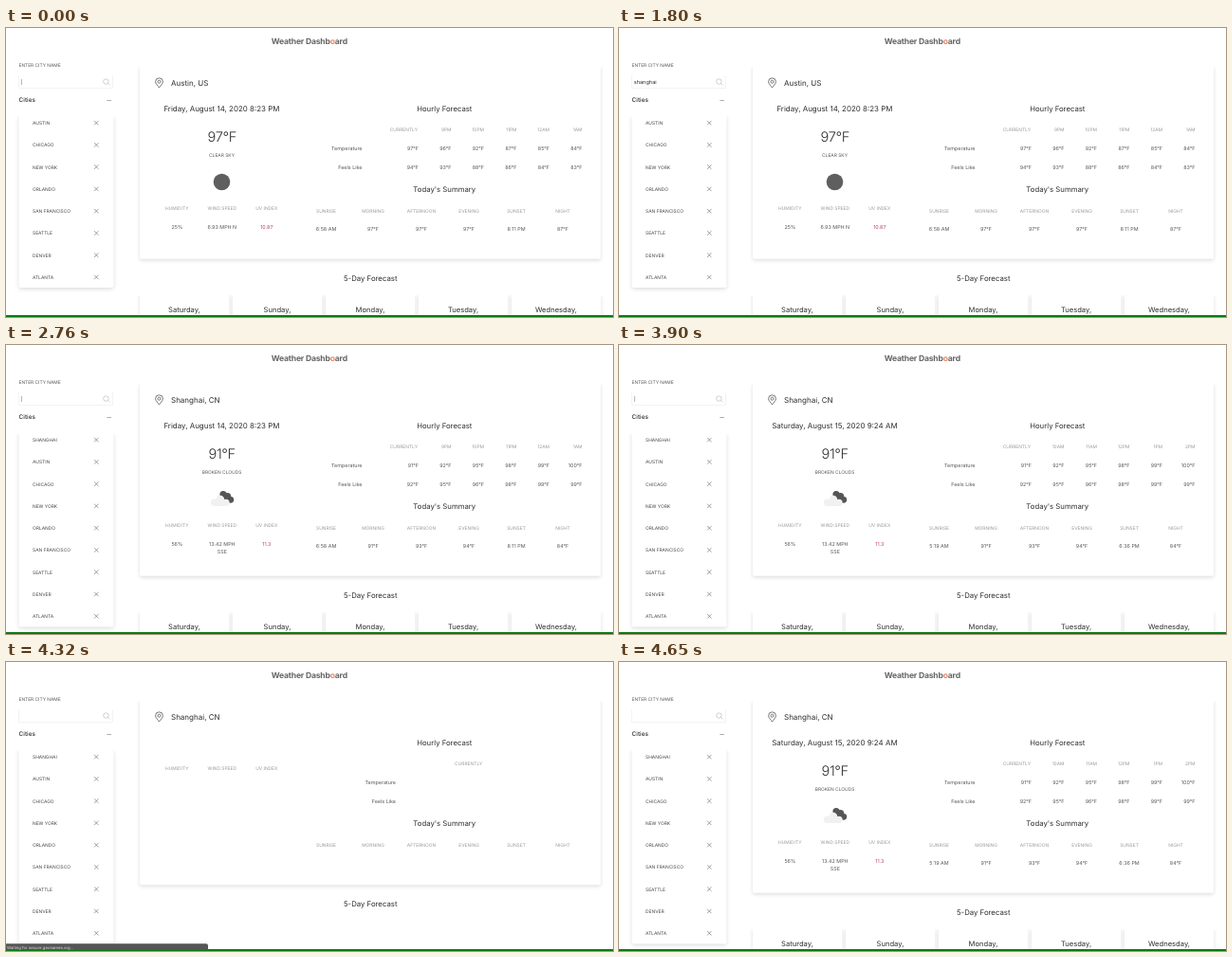
An HTML page with a canvas for the animation above (5430 ms loop, 640x305 px).

```html
<!DOCTYPE html>
<html lang="en">
<head>
<meta charset="utf-8">
<title>Weather Dashboard</title>
<style>
html, body { margin: 0; width: 100%; height: 100%; overflow: hidden; background: #fff; }
canvas { display: block; width: 640px; height: 305px; }
</style>
</head>
<body>
<canvas id="stage"></canvas>
<script>
const LOOP = 5430;
const canvas = document.getElementById('stage');
const ctx = canvas.getContext('2d');
const scale = window.devicePixelRatio || 1;
canvas.width = 640 * scale;
canvas.height = 305 * scale;

const INK = '#2e2e2e', MID = '#555', PALE = '#999';
const cities = ['AUSTIN', 'CHICAGO', 'NEW YORK', 'ORLANDO', 'SAN FRANCISCO', 'SEATTLE', 'DENVER', 'ATLANTA'];
const days = ['Saturday,', 'Sunday,', 'Monday,', 'Tuesday,', 'Wednesday,'];
const parts = ['SUNRISE', 'MORNING', 'AFTERNOON', 'EVENING', 'SUNSET', 'NIGHT'];
const hourX = [435, 469.5, 504, 538.5, 573, 607.5];
const partX = [337.5, 387, 438, 488, 538, 587];
const statX = [180.3, 227.8, 274.8];
const typedAt = [600, 690, 840, 990, 1080, 1230, 1290, 1350];

const evening = ['9PM', '10PM', '11PM', '12AM', '1AM'];
const austin = {
  date: 'Friday, August 14, 2020 8:23 PM', hours: evening,
  now: 97, sky: 'CLEAR SKY', humidity: '25%', wind: ['6.93 MPH N'], uv: '10.87',
  temps: [97, 96, 92, 87, 85, 84], feels: [94, 93, 88, 86, 84, 83],
  summary: ['6:58 AM', '97°F', '97°F', '97°F', '8:11 PM', '87°F']
};
const shanghai = {
  date: austin.date, hours: evening,
  now: 91, sky: 'BROKEN CLOUDS', humidity: '56%', wind: ['13.42 MPH', 'SSE'], uv: '11.3',
  temps: [91, 92, 95, 98, 99, 100], feels: [92, 95, 96, 98, 99, 99],
  summary: ['6:58 AM', '91°F', '93°F', '94°F', '8:11 PM', '84°F']
};
const shanghaiLocal = {
  ...shanghai,
  date: 'Saturday, August 15, 2020 9:24 AM',
  hours: ['10AM', '11AM', '12PM', '1PM', '2PM'],
  summary: ['5:19 AM', '91°F', '93°F', '94°F', '6:36 PM', '84°F']
};

// y is the middle of the capitals
function text(str, x, y, size, { align = 'left', color = INK, weight = 400, space = 0 } = {}) {
  ctx.font = `${weight} ${size}px Inter, "Open Sans", sans-serif`;
  ctx.textRendering = 'geometricPrecision';
  ctx.letterSpacing = space + 'px';
  ctx.textAlign = align;
  ctx.fillStyle = color;
  ctx.fillText(str, x, y + size * 0.36);
  return ctx.measureText(str).width;
}
const center = (str, x, y, size, opts) => text(str, x, y, size, { align: 'center', ...opts });
const right = (str, x, y, size, opts) => text(str, x, y, size, { align: 'right', ...opts });

function line(points, color, width) {
  ctx.beginPath();
  points.forEach(([x, y], i) => i ? ctx.lineTo(x, y) : ctx.moveTo(x, y));
  ctx.strokeStyle = color;
  ctx.lineWidth = width;
  ctx.stroke();
}

function disc(x, y, r, color) {
  ctx.beginPath();
  ctx.arc(x, y, r, 0, 7);
  ctx.fillStyle = color;
  ctx.fill();
}

// white box with a faint shadow at the sides and below, none above
function panel(x, y, w, h, shadow = true) {
  ctx.save();
  if (shadow) {
    ctx.shadowColor = 'rgba(0,0,0,.14)';
    ctx.shadowBlur = 4 * scale;
    ctx.shadowOffsetY = 1.5 * scale;
  }
  ctx.fillStyle = '#fff';
  ctx.beginPath();
  ctx.roundRect(x, y, w, h, 2);
  ctx.fill();
  ctx.restore();
  ctx.fillStyle = '#fff';
  ctx.fillRect(x - 5, y - 6, w + 10, 7);
}

function header() {
  const style = { weight: 700, color: '#666', space: -0.2 };
  let x = 279.7;
  x += text('Weather Dashb', x, 14.1, 8.6, style);
  x += text('o', x, 14.1, 8.6, { ...style, color: '#e8896b' });
  text('ard', x, 14.1, 8.6, style);
}

function sidebar(list, typed, caret) {
  text('ENTER CITY NAME', 13.5, 39.3, 4.85, { color: MID });
  line([[13.5, 50], [13.5, 63.5], [112.5, 63.5], [112.5, 50]], '#f0f0f0', 0.8);
  text(typed, 15.7, 57.1, 5.6);
  if (caret) line([[16.5, 54], [16.5, 60]], '#999', 0.7);
  ctx.beginPath();
  ctx.arc(105.4, 56.5, 2.7, 0, 7);
  ctx.strokeStyle = '#bbb';
  ctx.lineWidth = 0.7;
  ctx.stroke();
  line([[107.4, 58.5], [109.2, 60.3]], '#bbb', 0.7);
  text('Cities', 13.6, 76.1, 6.4, { weight: 500 });
  line([[106.3, 76.5], [111, 76.5]], '#999', 0.8);
  if (!list.length) return;
  panel(13.5, 92, 100, list.length * 23.3 - 4.3);
  list.forEach((city, i) => {
    const y = 100.2 + i * 23.27;
    text(city, 28, y, 4.9, { color: '#444' });
    line([[93.1, y - 2.3], [97.5, y + 2.1]], '#777', 0.7);
    line([[97.5, y - 2.3], [93.1, y + 2.1]], '#777', 0.7);
  });
}

function pin() {
  ctx.strokeStyle = '#555';
  ctx.lineWidth = 0.8;
  ctx.beginPath();
  ctx.moveTo(161.5, 63.1);
  ctx.bezierCurveTo(160.5, 61, 157.6, 59, 157.6, 56.7);
  ctx.arc(161.5, 56.7, 3.9, Math.PI, 0);
  ctx.bezierCurveTo(165.4, 59, 162.5, 61, 161.5, 63.1);
  ctx.stroke();
  ctx.beginPath();
  ctx.arc(161.5, 56.7, 1.5, 0, 7);
  ctx.stroke();
}

function clouds() {
  const dark = '#555', pale = '#f1f1f1';
  disc(229, 157.7, 3.6, dark);
  disc(233.3, 160, 4, dark);
  disc(236.8, 163.3, 3.4, dark);
  disc(225.8, 163.2, 4.4, pale);
  disc(219.5, 166.3, 3.7, pale);
  disc(232, 166.4, 3.6, pale);
  ctx.fillRect(219.5, 164.5, 12.5, 5.5);
}

function conditions(d) {
  center(d.date, 227.4, 85, 7.95);
  center(d.now + '°F', 227.7, 114.5, 14.6, { weight: 350, space: -0.4 });
  center(d.sky, 227.5, 133.8, 4.9, { color: MID });
  if (d === austin) disc(227.5, 162.5, 8.8, '#5f5f5f');
  else clouds();
  center(d.humidity, statX[0], 209.7, 5.4, { color: MID });
  d.wind.forEach((w, i) => center(w, statX[1], 209.7 + i * 8, 5.4, { color: MID }));
  center(d.uv, statX[2], 209.7, 5.4, { color: '#b8405c' });
}

function forecast(d) {
  const deg = (list, y) => list.forEach((v, i) => right(v + '°F', hourX[i], y, 5.4, { color: MID }));
  d.hours.forEach((h, i) => right(h, hourX[i + 1], 107.4, 4.9, { color: PALE }));
  deg(d.temps, 127.3);
  deg(d.feels, 147.5);
  d.summary.forEach((v, i) => center(v, partX[i], 212.4, 5.4, { color: MID }));
}

function main(place, data) {
  panel(141, 40, 486, data ? 203.7 : 195.3);
  pin();
  text(place, 174, 58.4, 8);
  const statY = data ? 189.8 : 112;
  ['HUMIDITY', 'WIND SPEED', 'UV INDEX'].forEach((s, i) => center(s, statX[i], statY, 4.9, { color: PALE }));
  center('Hourly Forecast', 462.3, 85, 7.75);
  center("Today's Summary", 462.3, 170.4, 7.75);
  const labelX = data ? 375.5 : 411;
  right('CURRENTLY', data ? 434 : 502.3, 107.4, 4.9, { color: PALE });
  right('Temperature', labelX, 127.2, 5.4, { color: MID });
  right('Feels Like', labelX, 147.4, 5.4, { color: MID });
  parts.forEach((p, i) => center(p, partX[i], 192.9, 4.9, { color: PALE }));
  if (data) {
    conditions(data);
    forecast(data);
  }
}

function week(y, cards) {
  center('5-Day Forecast', 384.2, y, 7.8);
  if (!cards) return;
  const left = i => 141 + i * 98;
  days.forEach((_, i) => panel(left(i), y + 16, 94.2, 60));
  days.forEach((day, i) => {
    panel(left(i), y + 16, 94.2, 60, false);
    center(day, left(i) + 47, y + 32.9, 7.6);
    center(`8/${15 + i}/2020`, left(i) + 47, y + 44.7, 7.6);
  });
}

function status(alpha) {
  ctx.globalAlpha = alpha;
  ctx.fillStyle = '#555';
  ctx.beginPath();
  ctx.roundRect(-3, 297.3, 216, 6.7, [0, 2, 0, 0]);
  ctx.fill();
  text('Waiting for secure.geonames.org...', 1, 301, 4.25, { color: '#ddd' });
  ctx.globalAlpha = 1;
}

function caretOn(t) {
  if (t < 600) return t < 240 || t >= 510;
  return t >= 1860 && t < 4110 && (t - 1860) % 900 < 450;
}

function dataAt(t) {
  if (t < 2310) return austin;
  if (t < 3900) return shanghai;
  return t >= 4170 && t < 4560 ? null : shanghaiLocal;
}

function statusAlpha(t) {
  if (t < 4110 || t >= 4650) return 0;
  if (t < 4500) return 1;
  return t < 4530 ? 0.8 : t < 4560 ? 0.5 : 0.2;
}

function draw(t) {
  ctx.setTransform(scale, 0, 0, scale, 0, 0);
  ctx.fillStyle = '#fff';
  ctx.fillRect(0, 0, 640, 305);
  const empty = t >= 4170 && t < 4260;
  const list = empty ? [] : t < 1860 ? cities : ['SHANGHAI', ...cities];
  const place = empty ? '' : t < 2160 ? 'Austin, US' : 'Shanghai, CN';
  const typed = t < 1860 ? 'shanghai'.slice(0, typedAt.filter(at => t >= at).length) : '';
  const data = dataAt(t);
  header();
  sidebar(list, typed, caretOn(t));
  main(place, data);
  if (empty) line([[460, 136.5], [608, 136.5]], '#ececec', 0.8);
  week(data ? 264.4 : 255.5, data || t >= 4470);
  ctx.fillStyle = '#0a7a14';
  ctx.fillRect(0, 303, 640, 2);
  const alpha = statusAlpha(t);
  if (alpha) status(alpha);
}

const start = performance.now();
function tick() {
  draw((performance.now() - start) % LOOP);
  requestAnimationFrame(tick);
}
tick();
</script>
</body>
</html>
```
